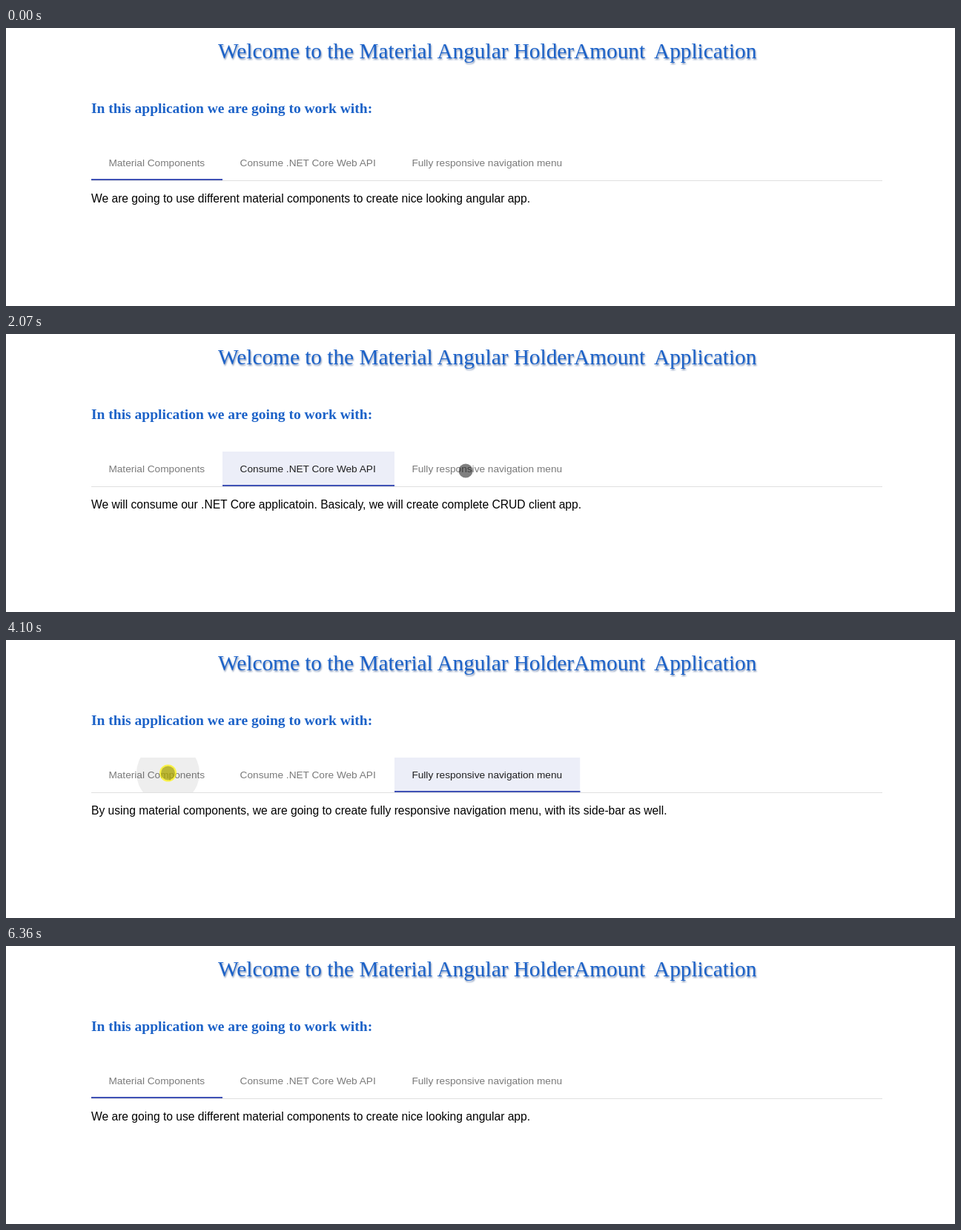
Animation, 1280 px wide and 376 px high, one loop 6.51 s. Source, as an HTML page:

```html
<!DOCTYPE html>
<html lang="en">
<head>
<meta charset="utf-8">
<title>Material tabs</title>
<style>
  html, body { margin: 0; width: 100%; height: 100%; overflow: hidden; background: #fff; }
  svg { display: block; }
  text { white-space: pre; }
  .title, .lead { font-family: "Liberation Serif", "Times New Roman", serif; fill: #1c62c8; }
  .title { font-size: 29.3px; text-shadow: 1px 2px 2px rgba(70, 100, 150, .65); }
  .lead { font-size: 19.53px; font-weight: bold; }
  .label, .body { font-family: "Liberation Sans", Arial, sans-serif; }
  .label { font-size: 13.67px; fill: rgba(0, 0, 0, .87); }
  .body { font-size: 15.625px; }
</style>
</head>
<body>
<svg id="stage" width="1280" height="376" viewBox="0 0 1280 376">
  <text class="title" x="286" y="41">Welcome to the Material Angular HolderAmount</text>
  <text class="title" x="874" y="41">Application</text>
  <text class="lead" x="115" y="115">In this application we are going to work with:</text>
  <rect x="115" y="206" width="1067" height="1" fill="#e0e0e0"/>
  <g id="tabs"></g>
  <rect id="ink" y="204" height="2" fill="#3f51b5"/>
  <svg id="bodies" x="115" y="208" width="1067" height="60" overflow="hidden"></svg>
  <g id="pointer">
    <circle id="flash" r="11.5" fill="rgba(255,245,0,.7)"/>
    <circle id="dot" r="9.5"/>
    <circle id="ring" r="9.9" fill="none" stroke="rgba(250,252,232,.8)" stroke-width="1.6"/>
  </g>
</svg>
<script>
const LOOP = 6510, WIDTH = 1067, TOP = 159, HEIGHT = 47, UNFOCUS = 6360;
const tabs = [
  { left: 115, width: 177, textX: 138.4, label: "Material Components",
    body: "We are going to use different material components to create nice looking angular app." },
  { left: 292, width: 232, textX: 315.6, label: "Consume .NET Core Web API",
    body: "We will consume our .NET Core applicatoin. Basicaly, we will create complete CRUD client app." },
  { left: 524, width: 250.5, textX: 547.4, label: "Fully responsive navigation menu",
    body: "By using material components, we are going to create fully responsive navigation menu, with its side-bar as well." }
];
// rest: ripple opacity that remains after the fade
const clicks = [
  { start: 1080, end: 1700, steps: 9, from: 0, to: 1, x: 448, y: 184.5, down: 1027, slide: 1175, rest: 0 },
  { start: 2490, end: 3030, steps: 8, from: 1, to: 2, x: 620, y: 185, down: 2443, slide: 2532, rest: 0 },
  { start: 4100, end: 4640, steps: 8, from: 2, to: 0, x: 218.5, y: 180, down: 4035, slide: 4130, rest: .045 }
];
const moves = [
  { start: 400, end: 930, steps: 8, a: [909.5, 361.5], b: [448, 184.5], enters: true },
  { start: 1850, end: 2070, steps: 4, a: [448, 184.5], b: [620, 185] },
  { start: 3180, end: 3640, steps: 7, a: [620, 185], b: [218.5, 180] },
  { start: 5270, end: 5890, steps: 9, a: [218.5, 180], b: [1203.5, 374.5] }
];
const POINTER_GONE = 5960;

const $ = id => document.getElementById(id);
const clamp = v => Math.min(1, Math.max(0, v));
const mix = (a, b, p) => a + (b - a) * p;
const show = (el, on) => el.setAttribute("visibility", on ? "visible" : "hidden");

function add(parent, tag, attrs, text = "") {
  const el = document.createElementNS("http://www.w3.org/2000/svg", tag);
  set(el, attrs);
  el.textContent = text;
  return parent.appendChild(el);
}
function set(el, attrs) {
  for (const key in attrs) el.setAttribute(key, attrs[key]);
}

function bezier(x1, y1, x2, y2) {
  const at = (s, a, b) => 3 * (1 - s) ** 2 * s * a + 3 * (1 - s) * s * s * b + s ** 3;
  return x => {
    if (x <= 0 || x >= 1) return clamp(x);
    let lo = 0, hi = 1;
    for (let i = 0; i < 24; i++) {
      const mid = (lo + hi) / 2;
      if (at(mid, x1, x2) < x) lo = mid; else hi = mid;
    }
    return at(lo, y1, y2);
  };
}
const slideEase = bezier(.35, 0, .25, 1);
const rippleEase = bezier(0, 0, .2, 1);
const moveEase = bezier(.4, 0, .4, 1);

const stepTime = (seg, i) =>
  Math.round((seg.start + (seg.end - seg.start) * i / (seg.steps - 1)) / 10) * 10;

function stepOf(seg, t) {
  let i = -1;
  while (i + 1 < seg.steps && stepTime(seg, i + 1) <= t) i++;
  return i;
}
const latest = (list, t) => list.filter(seg => seg.start <= t).pop();

for (const tab of tabs) {
  const { left, width } = tab;
  const box = add($("tabs"), "svg", { x: left, y: TOP, width, height: HEIGHT, overflow: "hidden" });
  tab.back = add(box, "rect", { width, height: HEIGHT, fill: "rgba(197,202,233,.32)" });
  tab.ripple = add(box, "circle", {});
  tab.text = add(box, "text", { class: "label", x: tab.textX - left, y: 28 }, tab.label);
  tab.tap = add(box, "rect", { width, height: HEIGHT, rx: 2, fill: "rgba(51,181,229,.4)" });
  tab.panel = add($("bodies"), "text", { class: "body", y: 28 }, tab.body);
}

function drawTabs(t) {
  const click = latest(clicks, t);
  const step = click ? stepOf(click, t) : -1;
  const now = click ? stepTime(click, step) : 0;
  const from = click ? click.from : 0, to = click ? click.to : 0;
  const p = click ? slideEase(clamp((now - click.slide) / 500)) : 1;
  const dir = Math.sign(to - from);
  const focus = !click || t >= UNFOCUS ? -1 : step > 0 ? to : click === clicks[0] ? -1 : from;

  tabs.forEach((tab, i) => {
    show(tab.back, i === focus);
    tab.text.setAttribute("opacity", i === focus ? 1 : .6);
    show(tab.tap, click && i === to && step === 1);
    show(tab.panel, i === to || (i === from && p < 1));
    tab.panel.setAttribute("x", i === to ? dir * (1 - p) * WIDTH : -dir * p * WIDTH);

    const rippling = click && i === to && t < UNFOCUS;
    show(tab.ripple, rippling);
    if (!rippling) return;
    const age = now - click.down;
    const cx = click.x - tab.left, cy = click.y - TOP;
    const reach = Math.hypot(Math.max(cx, tab.width - cx), Math.max(cy, HEIGHT - cy));
    const ramp = Math.min(.1, .05 + age / 4000);
    const fade = step === click.steps - 1 ? 1 : clamp((age - 400) / 200);
    set(tab.ripple, {
      cx, cy, r: reach * rippleEase(clamp(age / 450)), opacity: mix(ramp, click.rest, fade)
    });
  });

  set($("ink"), {
    x: mix(tabs[from].left, tabs[to].left, p),
    width: mix(tabs[from].width, tabs[to].width, p)
  });
  return step;
}

function drawPointer(t, clickStep) {
  const move = latest(moves, t);
  const visible = move && t < POINTER_GONE;
  const pressed = visible && clickStep === 0, after = visible && clickStep === 1;
  show($("pointer"), visible);
  show($("flash"), pressed);
  show($("dot"), visible);
  show($("ring"), after);
  if (!visible) return;
  const i = stepOf(move, t);
  const p = moveEase(move.enters ? i / (move.steps - 1) : (i + 1) / move.steps);
  const [x, y] = move.a.map((v, k) => mix(v, move.b[k], p));
  $("pointer").setAttribute("transform", `translate(${x} ${y})`);
  $("dot").setAttribute("fill", `rgba(0,0,0,${pressed ? .25 : .5})`);
}

function draw() {
  const t = performance.now() % LOOP;
  drawPointer(t, drawTabs(t));
  requestAnimationFrame(draw);
}
draw();
</script>
</body>
</html>
```
